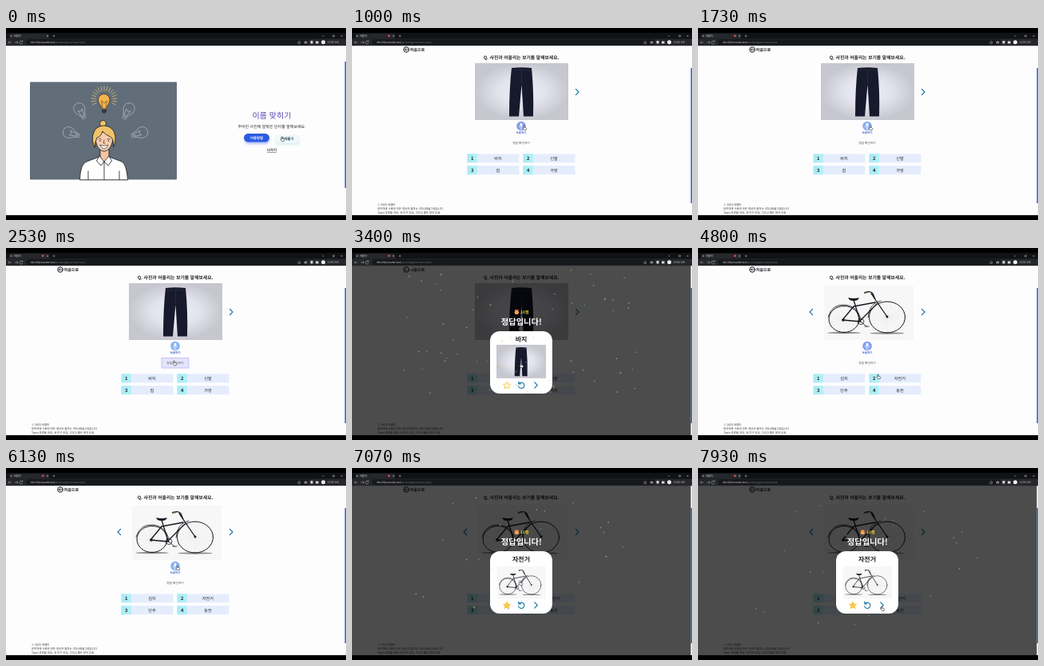
An HTML page for the animation above (8000 ms loop, 426 by 240 pixels).

```html
<!DOCTYPE html>
<html lang="ko">
<head>
<meta charset="utf-8">
<title>이름 맞히기</title>
<style>
html, body { margin: 0; width: 100%; height: 100%; overflow: hidden; background: #000; }
svg { display: block; width: 100vw; height: 100vh; }
text { font-family: 'Noto Sans CJK KR', 'Noto Sans CJK JP', 'Noto Sans CJK', sans-serif; text-rendering: geometricPrecision; fill: #252527; }
.mid { text-anchor: middle; }
.bold { font-weight: 700; }
.line { fill: none; stroke: #15181c; stroke-linecap: round; stroke-linejoin: round; }
.blue { fill: none; stroke: #237ba8; stroke-width: 1.2; stroke-linecap: round; stroke-linejoin: round; }

/* One 8 s clock; scenes cut without a fade. */
.scene { animation: 8s step-end infinite; }
.home { animation-name: home; }
.quiz { animation-name: quiz; }
.first { animation-name: first; }
.second { animation-name: second; }
.win1 { animation-name: win1; }
.win2 { animation-name: win2; }
.hover { animation-name: hover; }
.mic { animation-name: mic; }
@keyframes home { 0% { opacity: 1 } 8.1%, 100% { opacity: 0 } }
@keyframes quiz { 0% { opacity: 0 } 8.1%, 100% { opacity: 1 } }
@keyframes first { 0% { opacity: 0 } 8.1% { opacity: 1 } 55.6%, 100% { opacity: 0 } }
@keyframes second { 0% { opacity: 0 } 55.6%, 100% { opacity: 1 } }
@keyframes win1 { 0% { opacity: 0 } 35.6% { opacity: 1 } 55.6%, 100% { opacity: 0 } }
@keyframes win2 { 0% { opacity: 0 } 83.5%, 100% { opacity: 1 } }
@keyframes hover { 0% { opacity: 0 } 28.5% { opacity: 1 } 36% { opacity: 0 } 80.5% { opacity: 1 } 84%, 100% { opacity: 0 } }
@keyframes mic { 0% { fill: #8299ef } 19% { fill: #86b0f4 } 55.6% { fill: #829fef } 72%, 100% { fill: #86b0f4 } }

#cursor { animation: cursor 8s ease-in-out infinite; }
@keyframes cursor {
  0%, 8% { transform: translate(345px, 136px) }
  12.5%, 24% { transform: translate(215px, 122px) }
  30%, 40% { transform: translate(210px, 141px) }
  51.6% { transform: translate(220px, 172px) }
  54%, 56% { transform: translate(229px, 171px) }
  60% { transform: translate(225px, 158px) }
  69%, 77% { transform: translate(214px, 122px) }
  81.5%, 88% { transform: translate(210px, 141px) }
  97%, 100% { transform: translate(230px, 173px) }
}
.bit { animation: burst 8s infinite; opacity: 0; }
@keyframes burst {
  0% { transform: translate(212px, 130px); opacity: 1; animation-timing-function: cubic-bezier(.1, .7, .3, 1) }
  9% { transform: translate(var(--x), var(--y)) rotate(200deg); opacity: .9; animation-timing-function: ease-in }
  21% { transform: translate(var(--x), calc(var(--y) + 42px)) rotate(500deg); opacity: .25 }
  23%, 100% { transform: translate(var(--x), calc(var(--y) + 52px)); opacity: 0 }
}
</style>
</head>
<body>
<svg viewBox="0 0 426 240">
  <defs>
    <radialGradient id="wall"><stop stop-color="#edf0fa"/><stop offset=".5" stop-color="#e2e3ec"/><stop offset="1" stop-color="#c6c7cf"/></radialGradient>
    <linearGradient id="cell"><stop stop-color="#a9e9f5"/><stop offset="1" stop-color="#b4f2f5"/></linearGradient>
    <filter id="soft" x="-30%" y="-60%" width="160%" height="250%"><feGaussianBlur stdDeviation="1.6"/></filter>
    <g id="bulb" fill="none" stroke="#aeb7c1" stroke-width=".7" stroke-linecap="round">
      <path d="M-3 5C-3 2-7 0-7-5A7 7 0 0 1 7-5C7 0 3 2 3 5ZM-3 7H3M-2.5 9H2.5M-1.5 5L-3-3 0-1 3-3 1.5 5"/>
    </g>
    <g id="pants">
      <rect x="154" y="44" width="117" height="71" fill="url(#wall)"/>
      <path d="M200 50Q212 48.500 225 50Q228 80 227 110.500H215L212.500 71 209 110.500H197Q197 75 200 50Z" fill="#171a2c"/>
      <path d="M200 53Q212 52 225 53M212.500 53V70" fill="none" stroke="#30344a" stroke-width=".6"/>
    </g>
    <g id="bike">
      <rect x="158" y="47" width="112" height="68" fill="#f7f7f8"/>
      <ellipse cx="183" cy="106" rx="21" ry="1.200" fill="#8b8b8e"/>
      <ellipse cx="237" cy="106.500" rx="22" ry="1.200" fill="#8b8b8e"/>
      <g id="spokes" stroke="#c9c9cd" stroke-width=".2"></g>
      <g class="line" stroke-width="1">
        <ellipse cx="183" cy="89" rx="19" ry="16.500"/>
        <ellipse cx="237" cy="86.500" rx="22.500" ry="19.500"/>
        <path d="M163 86Q168 70 184 71Q199 72 204 88M213 87Q214 69 229 66" stroke-width=".8"/>
        <path d="M181 90L195 73 222 68M195 65L203 91 224 70M181 90L204 92M217 57L237 86M209 56Q216 53 219 57L222 64" stroke-width="1.300"/>
        <path d="M200 92A4 3.500 0 1 0 208 92A4 3.500 0 1 0 200 92M204 92L211 98M209 98H214" stroke-width=".8"/>
      </g>
      <path d="M188 62Q195 64 202 62L200 65Q195 67 190 65Z" fill="#15181c"/>
      <circle cx="182" cy="90" r="1.800" fill="#15181c"/><circle cx="237" cy="86" r="1.400" fill="#15181c"/>
      <path d="M208 56L213 55" stroke="#6b5742" stroke-width="2"/>
    </g>
    <g id="panel">
      <rect y="22" width="424.500" height="212" fill="#000" opacity=".7"/>
      <path d="M203.500 77H209L207.500 80H205Z" fill="#d54b4b"/>
      <circle cx="206.300" cy="80.500" r="2.600" fill="#f3a642"/>
      <text class="bold" x="211" y="82" font-size="5" style="fill:#f1d63c">10점</text>
      <text class="mid bold" x="212.300" y="96.200" font-size="10.300" style="fill:#fff">정답입니다!</text>
      <rect x="173" y="104" width="78" height="78" rx="12" fill="#fff"/>
    </g>
    <path id="tools" class="blue" d="M209.200 169.500A3.700 3.700 0 1 1 208.500 172.500M208.800 167V169.800H211.500M228.700 167.800L232.300 171.500 228.700 175.200"/>
    <path id="star" d="M194 167L195.400 170 198.600 170.400 196.300 172.600 196.900 175.800 194 174.200 191.100 175.800 191.700 172.600 189.400 170.400 192.600 170Z" stroke="#f4c950" stroke-width=".9" stroke-linejoin="round"/>
  </defs>

  <rect y="22" width="426" height="212" fill="#fdfdfe"/>

  <g class="scene home">
    <rect x="30" y="67.500" width="184" height="122" rx="1" fill="#616d79"/>
    <use href="#bulb" transform="translate(94 105) rotate(-28)"/>
    <use href="#bulb" transform="translate(152 105) rotate(28)"/>
    <use href="#bulb" transform="translate(83 132) rotate(-72)"/>
    <use href="#bulb" transform="translate(166 132) rotate(72)"/>
    <g id="rays" stroke="#f0ca72" stroke-width=".7" stroke-linecap="round"></g>
    <path d="M120 101C120 97 115.500 95 115.500 89A7.300 7.300 0 0 1 130 89C130 95 126 97 126 101Z" fill="#f2b34c" stroke="#382d20" stroke-width=".7"/>
    <path d="M120 102H126V105Q123 108 120 105Z" fill="#343840"/>
    <path d="M121 100L119.500 91 123 94 126.500 91 125 100" fill="none" stroke="#594021" stroke-width=".6"/>
    <g class="line" stroke-width=".8">
      <path d="M92.500 189.500Q93 170 101 167L117 161H129L145 167Q151 170 152.500 189.500Z" fill="#fff"/>
      <path d="M118 151V162L123 168 129 162V151Z" fill="#f3c4a4"/>
      <path d="M117 160L113.500 166 119 172 123 167 128 172 132.500 166 129 160L123 167Z" fill="#fff"/>
      <path d="M123 168V189.500M103 179V189.500M142 179V189.500"/>
      <circle cx="121.500" cy="119.500" r="4" fill="#f0c36a"/>
      <path d="M112 136C112 147 117 154 123 154S134 146 134 136V130H112Z" fill="#f6cbad"/>
      <path d="M111 149Q107 141 109 133Q112 122 123 122Q135 123 137 135Q138 142 134.500 149Q135 139 131 136Q125 134 121 129Q119 136 114 137Q112 141 111 149Z" fill="#f0c36a"/>
      <path d="M116 139Q118 137.500 119.500 139M127 139Q129 137.500 130.500 139M123 140L122 144H124" stroke-width=".6"/>
      <path d="M118 146.500Q123 148 128 146.500Q126 151 123 151T118 146.500Z" fill="#fff" stroke-width=".6"/>
    </g>
    <circle cx="118" cy="141" r=".7"/><circle cx="128.500" cy="141" r=".7"/>
    <text class="mid" x="333" y="112.700" font-size="10" font-weight="500" style="fill:#5245b2">이름 맞히기</text>
    <text class="mid" x="333" y="124.600" font-size="5">주어진 사진에 알맞은 단어를 말해보세요.</text>
    <rect x="299" y="135" width="31" height="10" rx="5" fill="#7597ee" opacity=".6" filter="url(#soft)"/>
    <rect x="337" y="137" width="31" height="9" rx="4.500" fill="#a6d3e0" opacity=".4" filter="url(#soft)"/>
    <rect x="298" y="132" width="32" height="10.500" rx="5.250" fill="#2b5be3"/>
    <rect x="336.500" y="133.500" width="32" height="10.500" rx="5.250" fill="#eef9fa"/>
    <text class="mid bold" x="314" y="138.800" font-size="4.400" style="fill:#fff">이용방법</text>
    <text class="mid bold" x="352.500" y="140.300" font-size="4.400" style="fill:#31515b">문제풀기</text>
    <text class="mid bold" x="333" y="154.200" font-size="4.300" text-decoration="underline">나가기</text>
    <rect x="424.500" y="42" width="1.500" height="158" fill="#2f62df"/>
  </g>

  <g class="scene quiz">
    <circle cx="68" cy="27" r="3.300" class="line"/>
    <path class="line" d="M69.700 27H66.500M67.700 25.600L66.300 27 67.700 28.400" stroke-width=".8"/>
    <text class="bold" x="72.600" y="29" font-size="5">처음으로</text>
    <text class="mid bold" x="212" y="38.800" font-size="5.800">Q. 사진과 어울리는 보기를 말해보세요.</text>
    <path class="blue" d="M280.500 76.500L284 80 280.500 83.500"/>
    <circle class="scene mic" cx="212" cy="122.500" r="5.800"/>
    <rect x="210.600" y="118.700" width="2.800" height="4.800" rx="1.400" fill="#fff"/>
    <path d="M209.200 122Q209.200 124.800 212 124.800T214.800 122M212 124.800V126.500M210.500 126.500H213.500" fill="none" stroke="#fff" stroke-width=".6"/>
    <text class="mid bold" x="212" y="132.200" font-size="3.500" style="fill:#3e63cd">녹음하기</text>
    <rect class="scene hover" x="195" y="137.500" width="34" height="12.500" fill="#e4e4fc" stroke="#b9aaf0" stroke-width=".7"/>
    <text class="mid" x="212" y="145" font-size="3.700" style="fill:#45454b">정답 확인하기</text>
    <g id="boxes"></g>
    <g class="scene first"><use href="#pants"/><g id="words1"></g></g>
    <g class="scene second">
      <use href="#bike"/><g id="words2"></g>
      <path class="blue" d="M143.500 76.500L140 80 143.500 83.500"/>
    </g>
    <g font-size="3.400">
      <text x="32" y="222">ⓒ 2023 새결터</text>
      <text x="32" y="227.200">본저작에 사용된 모든 영상의 출처는 (주)나래솔그림입니다</text>
      <text x="32" y="232.300">Team 푸른들 모임, 세 친구 모임, 그리고 좋은 분의 도움</text>
    </g>
    <rect x="424.500" y="50" width="1.500" height="169" fill="#2f62df"/>
  </g>

  <g class="scene win1">
    <use href="#panel"/>
    <text class="mid bold" x="212" y="117.400" font-size="8">바지</text>
    <use href="#pants" transform="translate(99.400 95) scale(.53 .59)"/>
    <use href="#star" fill="#fff7dc"/><use href="#tools"/>
    <g id="bits1"></g>
  </g>
  <g class="scene win2">
    <use href="#panel"/>
    <text class="mid bold" x="212" y="116.600" font-size="8">자전거</text>
    <use href="#bike" transform="translate(95.300 94.500) scale(.546 .6)"/>
    <use href="#star" fill="#f8c84d"/><use href="#tools"/>
    <g id="bits2"></g>
  </g>

  <g id="browser">
    <path d="M0 0H426V6H0ZM0 234H426V240H0Z"/>
    <rect y="6" width="426" height="7.500" fill="#111215"/>
    <path d="M2 13.500Q4 13 4 11V8.500Q4 7 6 7H52Q54 7 54 9V11Q54 13 56 13.500Z" fill="#25272b"/>
    <rect y="13.300" width="426" height="8.900" fill="#25272b"/>
    <rect x="25" y="14.200" width="354" height="7" rx="3.500" fill="#16181b"/>
    <circle cx="6.500" cy="10" r="1" fill="#8d97a0"/>
    <text x="9.500" y="11.300" font-size="3.400" style="fill:#ddd">새결터</text>
    <g stroke="#bbb" stroke-width=".5" fill="none">
      <path d="M51 9L53 11M53 9L51 11M58.500 10H61.500M60 8.500V11.500M396 10H398.500M409.500 9H411.500V11H409.500ZM419.500 9L421.500 11M421.500 9L419.500 11"/>
      <path d="M7 18H3M4.500 16.500L3 18 4.500 19.500M11 18H15M13.500 16.500L15 18 13.500 19.500M20.500 17A2 2 0 1 0 20.700 18.800M20.700 15.500V17.200H19"/>
      <path d="M366 17H368.500V19.500H366ZM374 19.500L375.500 16 377 19.500 373.500 17.500H377.500Z"/>
    </g>
    <path d="M381.500 16H384.500V19.500H381.500ZM388 16.500H391.500V19.500H388Z" fill="#d5d5d7"/>
    <circle cx="397.500" cy="17.800" r="2.500" fill="#eee"/>
    <text x="402" y="19" font-size="3.200" style="fill:#ddd">시크릿 모드</text>
    <path d="M427 16V16.600" stroke="#ddd" stroke-width=".7" transform="translate(-1)"/>
    <text x="31" y="19" font-size="3.200" style="fill:#e0e0e0">k8c105p.haedal.test<tspan fill="#777a7e">/picture/game/name-quiz</tspan></text>
    <g class="scene quiz"><rect x="45" y="8.600" width="2.500" height="2.500" rx="1" fill="#d8594f"/></g>
  </g>

  <g id="cursor">
    <path d="M0 0Q.8-.6 1.100.4V2.300L3.200 2.800Q3.900 3.100 3.600 4.300L3.100 5.600H.7L-1.200 3.200Q-1 2.600 0 3.100Z" fill="#fff" stroke="#25272b" stroke-width=".6"/>
  </g>
</svg>
<script>
const NS = 'http://www.w3.org/2000/svg';
const byId = id => document.getElementById(id);

function add(parent, tag, attrs, text = '') {
  const node = document.createElementNS(NS, tag);
  for (const key in attrs) node.setAttribute(key, attrs[key]);
  node.textContent = text;
  return byId(parent).appendChild(node);
}

const slot = i => ({ x: 144.5 + i % 2 * 70, y: 157.3 + Math.floor(i / 2) * 14.9 });
for (let i = 0; i < 4; i++) {
  const { x, y } = slot(i);
  add('boxes', 'rect', { x, y, width: 65, height: 11, fill: '#e5edfd' });
  add('boxes', 'rect', { x, y, width: 12.5, height: 11, fill: 'url(#cell)' });
  add('boxes', 'text', { x: x + 6.2, y: y + 7.6, 'font-size': 5.8, class: 'mid bold' }, i + 1);
}
function words(parent, list) {
  list.forEach((word, i) => {
    const { x, y } = slot(i);
    add(parent, 'text', { x: x + 38.5, y: y + 7.3, 'font-size': 5.2, class: 'mid' }, word);
  });
}
words('words1', ['바지', '신발', '컵', '가방']);
words('words2', ['김치', '자전거', '단추', '동전']);

function radial(parent, cx, cy, rx, ry, inner, count, from = 0, sweep = Math.PI * 2) {
  for (let i = 0; i < count; i++) {
    const a = from + sweep * i / count, c = Math.cos(a), s = Math.sin(a);
    add(parent, 'line', { x1: cx + c * rx * inner, y1: cy + s * ry * inner, x2: cx + c * rx, y2: cy + s * ry });
  }
}
radial('spokes', 183, 89, 18, 15.5, 0, 20);
radial('spokes', 237, 86.5, 21.5, 18.5, 0, 24);
radial('rays', 123, 89, 16, 16, .68, 17, Math.PI * .86, Math.PI * 1.36);

let seed = 41;
const random = () => (seed = seed * 16807 % 2147483647) / 2147483647;
const colors = ['#e6a54b', '#7ebbdc', '#d986a5', '#96c278', '#eadc78', '#9c8fda'];
function confetti(parent, count, delay) {
  for (let i = 0; i < count; i++) {
    const bit = add(parent, 'rect', {
      class: 'bit', width: 1 + random() * .7, height: .8 + random() * .6, fill: colors[i % colors.length]
    });
    bit.style.setProperty('--x', 60 + random() * 300 + 'px');
    bit.style.setProperty('--y', 20 + random() * 165 + 'px');
    bit.style.animationDelay = delay + 's';
  }
}
confetti('bits1', 64, 2.85);
confetti('bits2', 24, 6.68);
</script>
</body>
</html>
```
